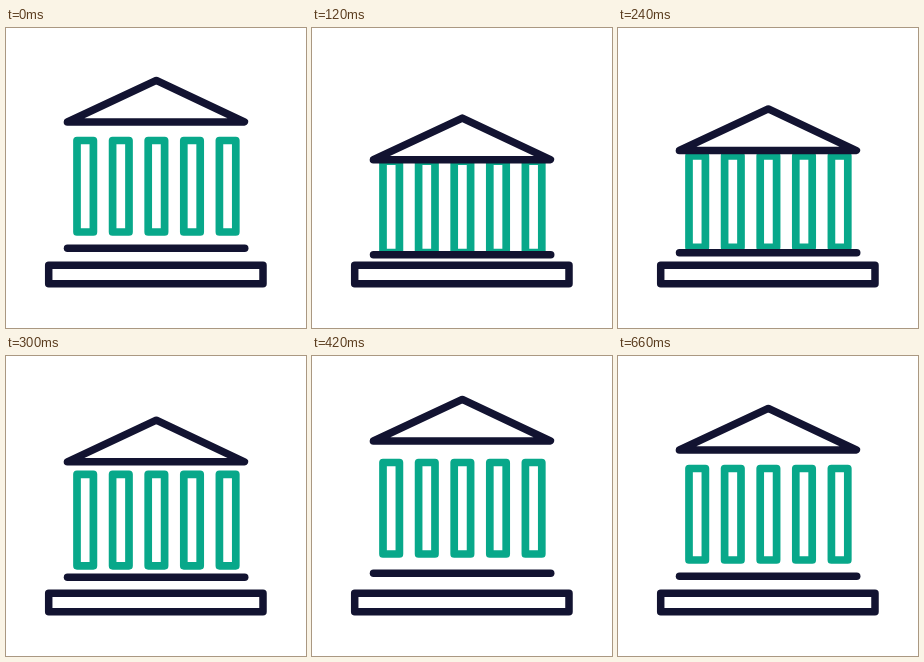
Recreate the animation shown at these times as an HTML page. Size 300 by 300 pixels, loop 720 ms.

```html
<!DOCTYPE html>
<html lang="en">
<head>
<meta charset="utf-8">
<title>Columned building</title>
<style>
  html, body { margin: 0; width: 100%; height: 100%; overflow: hidden; background: #fff; }
  svg { display: block; width: 100vw; height: 100vh; }
  svg * { fill: none; stroke-linecap: round; stroke-linejoin: round; }
  .navy { stroke: #121331; stroke-width: 7.5; }
  .teal { stroke: #08a88a; stroke-width: 7.7; }
</style>
</head>
<body>
<svg viewBox="0 0 300 300">
  <rect class="navy" x="42.7" y="237.2" width="214.3" height="18.6"/>
  <g id="columns" class="teal"></g>
  <path id="step" class="navy" d="M61.5 220.2H238.7"/>
  <path id="roof" class="navy" d="M61.4 94L150.3 52.4L238.4 94Z"/>
</svg>
<script>
  const LOOP = 720, TICK = 30;
  const times = [0, 150, 417, 660, LOOP];
  // Vertical offset of each part at the times above
  const parts = {
    roof: [0, 42, -9, 0, 0],
    columns: [0, 23, -6, 0, 0],
    step: [0, 7.2, -3, 0, 0]
  };
  const byId = id => document.getElementById(id);

  byId('columns').innerHTML = Array.from({ length: 5 }, (_, i) =>
    `<rect x="${71 + i * 35.6}" y="112.5" width="16.4" height="91.5"/>`).join('');

  const smooth = x => x * x * (3 - 2 * x);

  function offset(values, t) {
    const i = times.findIndex(end => t < end) - 1;
    const x = (t - times[i]) / (times[i + 1] - times[i]);
    return values[i] + (values[i + 1] - values[i]) * smooth(x);
  }

  function draw() {
    const t = Math.floor(performance.now() % LOOP / TICK) * TICK;
    for (const [id, values] of Object.entries(parts)) {
      byId(id).setAttribute('transform', `translate(0 ${offset(values, t).toFixed(2)})`);
    }
    requestAnimationFrame(draw);
  }
  draw();
</script>
</body>
</html>
```
